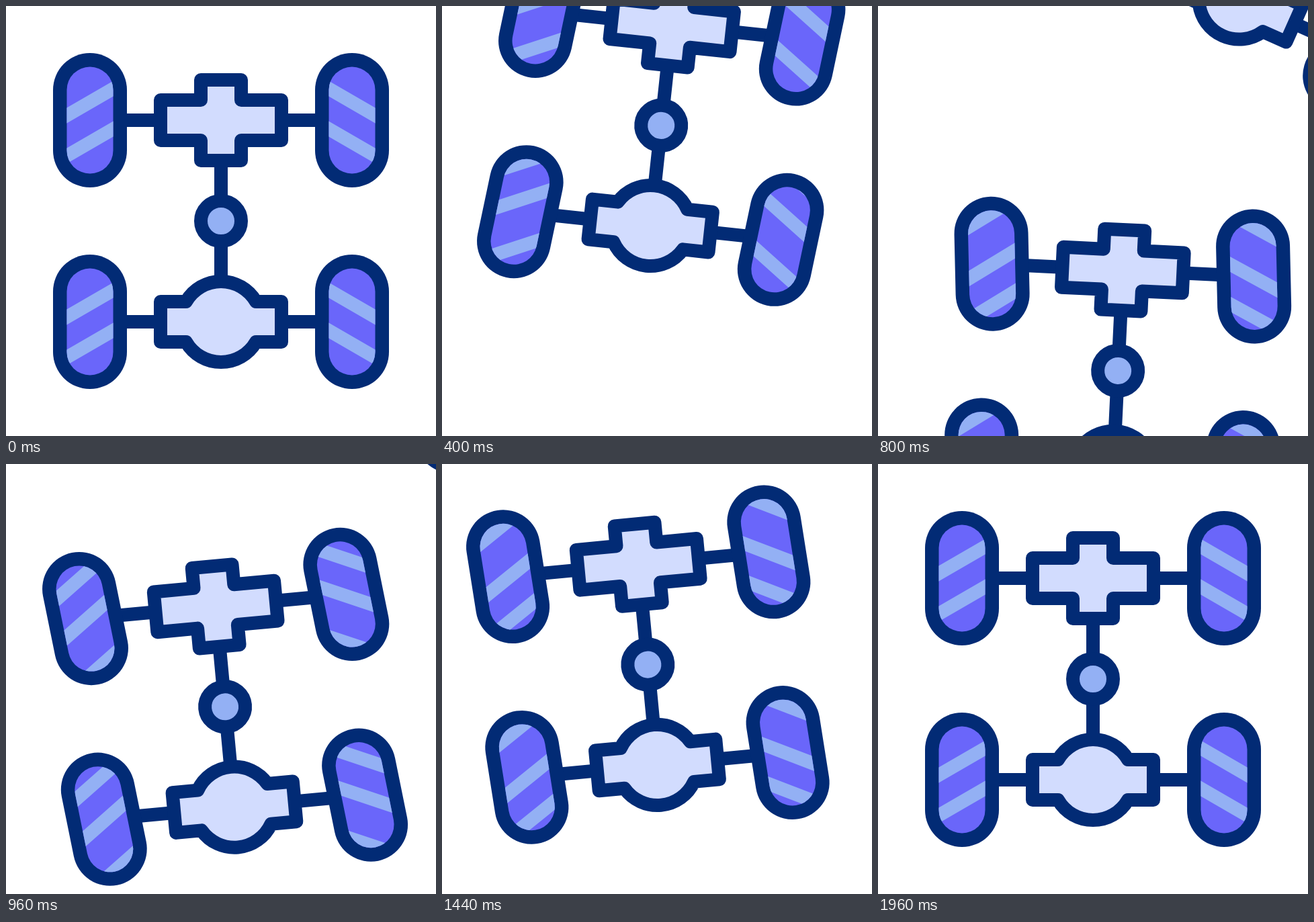
Write an HTML page with a canvas that moves like this. It is 640 by 640 pixels and loops after 2000 ms.

```html
<!DOCTYPE html>
<html lang="en">
<head>
<meta charset="utf-8">
<title>Four-wheel drive</title>
<style>
  html, body { margin: 0; width: 100%; height: 100%; overflow: hidden; background: #fff; }
  canvas { display: block; width: 100%; height: 100%; }
</style>
</head>
<body>
<canvas width="640" height="640"></canvas>
<script>
const ctx = document.querySelector('canvas').getContext('2d');
const NAVY = '#022b75', PURPLE = '#6a66fa', BLUE = '#93b0f4', PALE = '#d2dcfe';
const LOOP = 2000, STEP = 40, PERIOD = 136, RAD = Math.PI / 180;

// Poses: hub x, hub y, body angle, wheel angle (degrees), tread travel.
// Each list is a Bezier curve through pose space.
const home = [320, 320, 0, 0, 0];
const overshoot = [300, 289, -9, -16, 47];
const leave = [home, [294, 26, 13.9, 26.8, 447], [501, -203, 15.3, 32.7, 727], [841, -179, 38.8, 52.8, 840]];
const arrive = [[184, 965, 12.9, 14.1, -878], [457, 672, 11.2, 8.5, -352], overshoot];
const settle = [overshoot, [310, 304, -2.8, -3.6, 16], home];

const axle = new Path2D('M-195-150H195M-195 150H195M0-90V90');
const gearbox = new Path2D('M-90-180H-30V-210H30V-180H90V-120H30V-90H-30V-120H-90Z');
const differential = new Path2D('M-90 120H-52A60 60 0 0 1 52 120H90V180H52A60 60 0 0 1-52 180H-90Z');
const hub = new Path2D('M30 0A30 30 0 1 1-30 0A30 30 0 1 1 30 0Z');
const tyre = pill(110, 200), tread = pill(69, 159);

function pill(w, h) {
  const p = new Path2D();
  p.roundRect(-w / 2, -h / 2, w, h, w / 2);
  return p;
}

function ease(t, from, to) {
  const u = Math.min(1, Math.max(0, (t - from) / (to - from)));
  return (1 - Math.cos(Math.PI * u)) / 2;
}

function bezier(poses, p) {
  while (poses.length > 1)
    poses = poses.slice(1).map((pose, i) => pose.map((v, c) => poses[i][c] + (v - poses[i][c]) * p));
  return poses[0];
}

function outlined(path, fill) {
  ctx.fillStyle = fill;
  ctx.fill(path);
  ctx.stroke(path);
}

function wheel(x, y, angle, travel) {
  ctx.save();
  ctx.translate(x, y);
  ctx.rotate(angle);
  if (x > 0) ctx.scale(-1, 1);
  ctx.fillStyle = NAVY;
  ctx.fill(tyre);
  ctx.fillStyle = PURPLE;
  ctx.fill(tread);
  ctx.clip(tread);
  ctx.strokeStyle = BLUE;
  ctx.beginPath();
  const first = (travel - 27) % PERIOD;
  for (let n = -2; n <= 2; n++) {
    for (const gap of [0, 60]) {
      const mid = first + n * PERIOD + gap;
      ctx.moveTo(-60, mid + 34.6);
      ctx.lineTo(60, mid - 34.6);
    }
  }
  ctx.stroke();
  ctx.restore();
}

// skew: how much further the outer wheels roll per degree of turn
function chassis([x, y, turn, steer, travel], skew) {
  ctx.save();
  ctx.translate(x, y);
  ctx.rotate(turn * RAD);
  ctx.lineWidth = 20;
  ctx.lineJoin = 'round';
  ctx.strokeStyle = NAVY;
  ctx.stroke(axle);
  outlined(gearbox, PALE);
  outlined(differential, PALE);
  outlined(hub, BLUE);
  for (const side of [-1, 1])
    for (const end of [-1, 1])
      wheel(side * 195, end * 150, (steer - turn) * RAD, travel - side * skew * turn);
  ctx.restore();
}

function draw(now) {
  const t = Math.floor(now % LOOP / STEP) * STEP;
  ctx.fillStyle = '#fff';
  ctx.fillRect(0, 0, 640, 640);
  if (t < 1120) {
    chassis(bezier(leave, ease(t, 120, 1160)), 1.3);
    chassis(bezier(arrive, ease(t, 320, 1120)), 0);
  } else {
    chassis(bezier(settle, ease(t, 1120, 1960)), 0);
  }
}

const start = performance.now();
function tick() {
  draw(performance.now() - start);
  requestAnimationFrame(tick);
}
tick();
</script>
</body>
</html>
```
